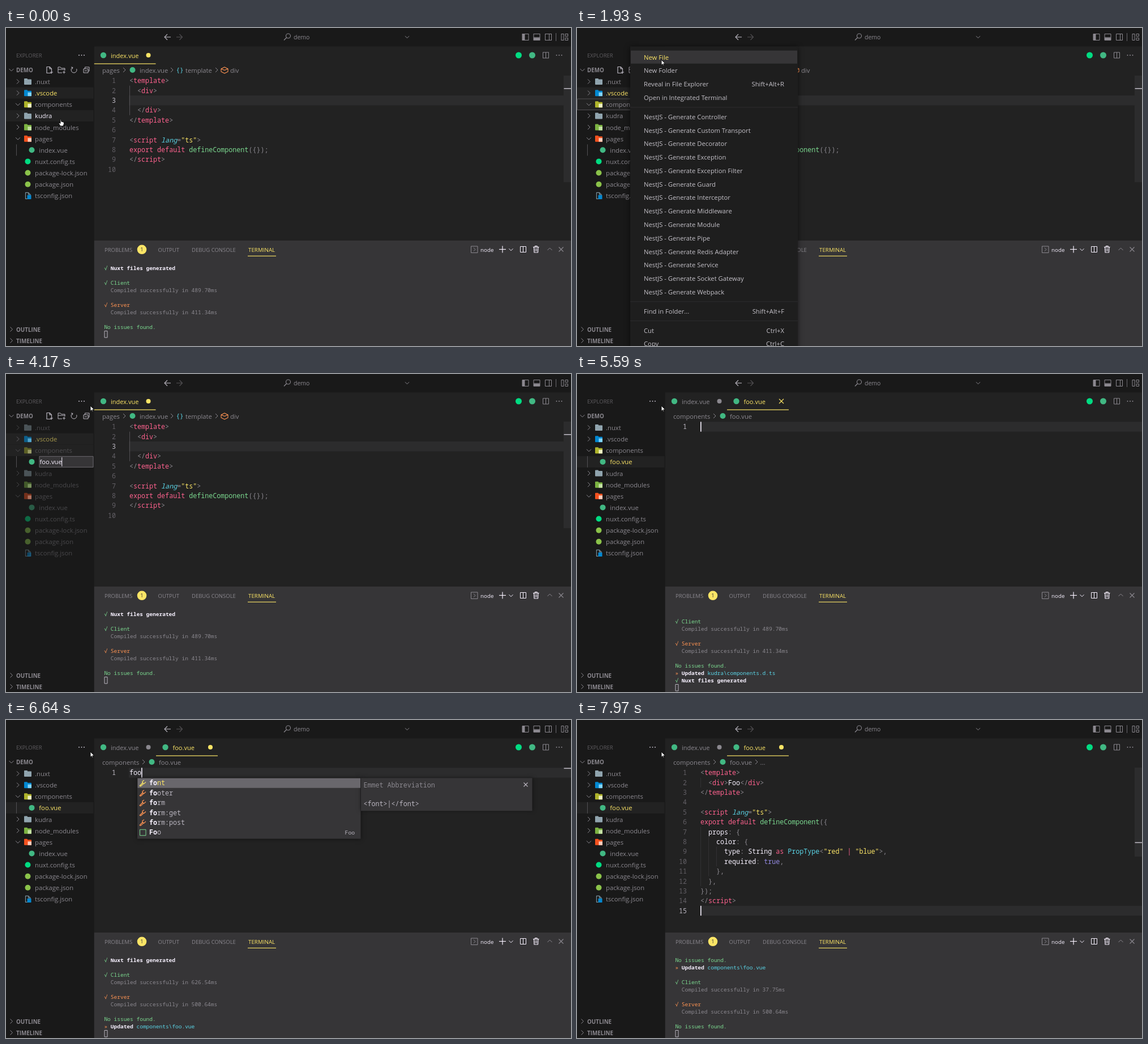
Write an HTML page with a canvas that moves like this. It is 998 px wide and 561 px high and loops after 8000 ms.

```html
<!DOCTYPE html>
<html lang="en">
<head>
<meta charset="utf-8">
<title>Editor demo</title>
<style>
html, body { margin: 0; width: 100%; height: 100%; overflow: hidden; background: #191919; }
canvas { display: block; width: 998px; height: 561px; }
</style>
</head>
<body>
<canvas id="stage" width="998" height="561"></canvas>
<script>
const ctx = document.getElementById('stage').getContext('2d');
const LOOP = 8000;
const UI = '"Open Sans", "Noto Sans", sans-serif';
const MONO = '"Noto Sans Mono", "DejaVu Sans Mono", monospace';
const C = {
  d: '#8b888f', p: '#fc618d', y: '#fce566', g: '#7bd88f', b: '#5ad4e6',
  v: '#948ae3', w: '#f7f1ff', o: '#fd9353', l: '#bab6c0', i: '#5ad4e6'
};
const DARK = '#191919', EDITOR = '#222222', PANEL = '#363537', FAINT = '#69676c';
const VUE = '#41b883', NUXT = '#00dc82';

// ---- primitives ----
function rect(x, y, w, h, color) { ctx.fillStyle = color; ctx.fillRect(x, y, w, h); }
function frame(x, y, w, h, color, lw = 1) {
  ctx.strokeStyle = color; ctx.lineWidth = lw; ctx.strokeRect(x, y, w, h);
}
function disc(x, y, r, color) {
  ctx.fillStyle = color; ctx.beginPath(); ctx.arc(x, y, r, 0, 7); ctx.fill();
}
function line(color, lw, ...pts) {
  ctx.strokeStyle = color; ctx.lineWidth = lw; ctx.beginPath();
  for (let i = 0; i < pts.length; i += 2) ctx.lineTo(pts[i], pts[i + 1]);
  ctx.stroke();
}
function poly(x, y, pts, fill, stroke) {
  ctx.beginPath();
  for (let i = 0; i < pts.length; i += 2) ctx.lineTo(x + pts[i], y + pts[i + 1]);
  ctx.closePath();
  ctx.fillStyle = fill; ctx.strokeStyle = stroke; ctx.lineWidth = 1;
  ctx.fill(); ctx.stroke();
}
// y is the middle of the capital letters
function text(s, x, y, color, size = 11.25, weight = '', align = 'left') {
  ctx.font = `${weight} ${size}px ${UI}`;
  ctx.textAlign = align; ctx.fillStyle = color;
  ctx.fillText(s, x, y + size * 0.36);
}
// Runs split by "~"; the first letter is the colour, a capital means bold
function code(src, x, y, size = 11.7) {
  ctx.textAlign = 'left';
  for (const run of src.split('~')) {
    const key = run[0], low = key.toLowerCase(), s = run.slice(1);
    ctx.font = `${key === 'i' ? 'italic' : ''} ${key !== low ? 'bold' : ''} ${size}px ${MONO}`;
    ctx.fillStyle = C[low];
    ctx.fillText(s, x, y + size * 0.35);
    x += ctx.measureText(s).width;
  }
}
function chevron(x, y, dir, color = C.d, r = 4) {
  if (dir === 'right') line(color, 1, x - r / 2, y - r, x + r / 2, y, x - r / 2, y + r);
  else {
    const k = dir === 'up' ? -1 : 1;
    line(color, 1, x - r, y - k * r / 2, x, y + k * r / 2, x + r, y - k * r / 2);
  }
}
function cross(x, y, r, color) {
  line(color, 1.1, x - r, y - r, x + r, y + r);
  line(color, 1.1, x + r, y - r, x - r, y + r);
}
function dots(x, y, color) { for (const k of [-4.5, 0, 4.5]) disc(x + k, y, 1, color); }
function split(x, y, color) { frame(x - 5, y - 5, 10, 10, color); line(color, 1, x, y - 5, x, y + 5); }

// ---- icons ----
function folder(x, y, color, badge) {
  ctx.fillStyle = color;
  ctx.beginPath();
  ctx.roundRect(x - 6.5, y - 5.5, 6, 4, 1);
  ctx.roundRect(x - 6.5, y - 4, 13, 9.5, 1);
  ctx.fill();
  if (badge) rect(x, y - 1, 6.5, 6.5, badge);
}
function page(x, y, color) {
  line(color, 1.2, x + 1, y - 5.5, x - 4, y - 5.5, x - 4, y + 5.5, x + 4.5, y + 5.5, x + 4.5, y - 2, x + 1, y - 5.5);
  line(color, 1.2, x + 1, y - 5.5, x + 1, y - 2, x + 4.5, y - 2);
}
const icons = {
  grey: (x, y) => folder(x, y, '#90a4ae'),
  blue: (x, y) => folder(x, y, '#0288d1', '#81d4fa'),
  lime: (x, y) => folder(x, y, '#afb42b', '#f0f4c3'),
  green: (x, y) => folder(x, y, '#7cb342', '#c5e1a5'),
  red: (x, y) => folder(x, y, '#f4511e', '#ffccbc'),
  vue: (x, y) => disc(x, y, 5, VUE),
  nuxt: (x, y) => disc(x, y, 5, NUXT),
  js: (x, y) => disc(x, y, 5, '#8bc34a'),
  ts: (x, y) => { page(x, y, '#78909c'); rect(x - 1, y - 1, 7, 7, '#0288d1'); },
  page: (x, y) => page(x, y, '#42a5f5')
};

// ---- sidebar ----
// name, icon, chevron, depth
const FILES = [
  ['.nuxt', 'grey', 'right'], ['.vscode', 'blue', 'right'], ['components', 'lime', 'down'],
  ['kudra', 'grey', 'right'], ['node_modules', 'green', 'right'], ['pages', 'red', 'down'],
  ['index.vue', 'vue', '', 1], ['nuxt.config.ts', 'nuxt'], ['package-lock.json', 'js'],
  ['package.json', 'js'], ['tsconfig.json', 'ts']
];
const NEW_ROW = ['foo.vue', 'vue', '', 1];
const TYPED = [[3200, 'f'], [3300, 'fo'], [3400, 'foo'], [3600, 'foo.'], [3800, 'foo.v'], [3970, 'foo.vu'], [4170, 'foo.vue']];
const ERROR = ['The name foo. is', 'not valid as a', 'file or folder', 'name. Please', 'choose a', 'different name.'];
const last = (list, t) => list.reduce((r, [at, v]) => t >= at ? v : r, '');

function sidebar(t) {
  rect(0, 0, 155.5, 561, DARK);
  text('EXPLORER', 18, 48.5, '#5f5d61', 9.5);
  dots(133.5, 48, C.l);
  chevron(9.5, 74, 'down');
  text('DEMO', 18, 74.5, C.d, 9.8, 'bold');

  const editing = t >= 2010 && t < 4530, made = t >= 4530;
  if (!made) {
    page(76, 74, C.l); line(C.l, 1, 78, 78, 83, 78); line(C.l, 1, 80.5, 75.5, 80.5, 80.5);
    line(C.l, 1, 99, 79, 92, 79, 92, 69, 96, 69, 98, 71, 104, 71, 104, 75);
    line(C.l, 1, 92, 73, 104, 73); line(C.l, 1, 100, 78, 105, 78); line(C.l, 1, 102.5, 75.5, 102.5, 80.5);
    ctx.beginPath(); ctx.arc(120, 74, 5, -0.4, 4.2); ctx.stroke();
    line(C.l, 1, 115, 69, 118, 69.5, 117, 72.5);
    frame(137, 72, 8, 7, C.l); line(C.l, 1, 139.5, 72, 139.5, 69, 147, 69, 147, 76, 145, 76);
    line(C.l, 1, 139, 75.5, 143, 75.5);
  }
  const rows = FILES.slice();
  if (editing || made) rows.splice(3, 0, NEW_ROW);
  const hover = t < 220 ? 3 : t < 1960 ? 2 : -1;
  rows.forEach(([name, icon, chev, depth = 0], i) => {
    const y = 94.5 + 20.13 * i, top = y - 10, x = 38.5 + depth * 7;
    const selected = made ? i === 3 : i === 1;
    if (selected || i === hover || (editing && i === 2)) rect(0, top, 154.5, 20, EDITOR);
    const fresh = editing && i === 3;
    if (depth && (fresh || (made && i === 3) || (!editing && !made))) line('#525053', 1, 18.5, top, 18.5, top + 20);
    if (fresh) return input(t, y);
    ctx.globalAlpha = editing ? (selected ? 0.6 : 0.42) : 1;
    if (chev) chevron(21, y, chev);
    icons[icon](x, y);
    const bright = i === hover && t < 1110;
    text(name, 51 + depth * 7.3, y + 0.5, selected ? C.y : bright ? C.w : C.d);
    ctx.globalAlpha = 1;
  });
  if (t >= 1110 && t < 2010) frame(0.5, 125, 154, 19.5, '#525053');
  if (t >= 3600 && t < 3800) {
    rect(58.5, 164.5, 96.5, 87, PANEL);
    frame(59, 165, 95.5, 86.5, C.p);
    ERROR.forEach((s, i) => text(s, 62, 174 + i * 13.7, C.p, 10.3));
  }
  for (const [s, y] of [['OUTLINE', 531.5], ['TIMELINE', 551.5]]) {
    chevron(9.5, y, 'right');
    text(s, 18, y + 0.5, C.d, 9.8, 'bold');
  }
}
function input(t, y) {
  const s = last(TYPED, t);
  icons[t >= 4170 ? 'vue' : 'page'](45.5, y);
  rect(58.5, y - 10, 96, 20, PANEL);
  frame(59, y - 9.5, 95, 19, FAINT);
  text(s, 59.5, y + 0.5, C.w);
  const on = t < 2540 || t >= 3070;
  if (on) rect(59 + (s ? ctx.measureText(s).width : 0), y - 8, 1, 16, C.w);
}

// ---- editor ----
const SCRIPT = 'd<~pscript ~ilang~d=~y"ts"~d>';
const INDEX = [
  'd<~ptemplate~d>', 'd  <~pdiv~d>', 'd', 'd  </~pdiv~d>', 'd</~ptemplate~d>', 'd', SCRIPT,
  'pexport default ~gdefineComponent~d({});', 'd</~pscript~d>', 'd'
];
const FOO = [
  'd<~ptemplate~d>', 'd  <~pdiv~d>~wFoo~d</~pdiv~d>', 'd</~ptemplate~d>', 'd', SCRIPT,
  'pexport default ~gdefineComponent~d({', 'w  props~d: {', 'w    color~d: {',
  'w      type~d: ~wString ~pas ~bPropType~d<~y"red"~p | ~y"blue"~d>,',
  'w      required~d: ~vtrue~d,', 'd    },', 'd  },', 'd});', 'd</~pscript~d>', 'd'
];
const LINE = 17.39, TOP = 84.3, COL = 7.02, LEFT = 218;
const WORD = [[6250, 'f'], [6480, 'fo'], [6610, 'foo']];

function tab(x, name, active, mark) {
  disc(x + 16.5, 48, 5.2, VUE);
  text(name, x + 29.5, 49, active ? C.y : C.d, 11);
  const color = active ? C.y : C.d;
  if (mark === 'x') cross(x + 96, 48, 4, color);
  else disc(x + 96, 48, 4, color);
  if (active) rect(x, 62.5, 109, 1.2, C.y);
}
function crumbs(parts) {
  for (const [kind, x, s] of parts) {
    if (kind === '>') chevron(x, 74, 'right', C.d, 4);
    else if (kind === 'vue') disc(x, 74, 5, VUE);
    else text(s, x, 74.5, C.d, 11.2);
  }
}
function editor(t) {
  rect(155.5, 32.5, 842.5, 342.5, EDITOR);
  const opened = t >= 4590, done = t >= 7640;
  const word = last(WORD, t);
  tab(155.5, 'index.vue', !opened);
  if (opened) tab(265, 'foo.vue', true, t < 6250 ? 'x' : 'dot');
  disc(905.5, 48, 5.5, NUXT);
  disc(929.5, 48, 5.5, VUE);
  split(953.5, 48, C.d);
  dots(977, 48, C.d);

  if (!opened) {
    crumbs([['', 170, 'pages'], ['>', 209], ['vue', 223.5], ['', 236, 'index.vue'], ['>', 293],
      ['', 317, 'template'], ['>', 372], ['', 396, 'div']]);
    code('b{}', 300.5, 74, 11);
    ctx.lineJoin = 'round';
    line(C.o, 1.1, 380, 72, 386, 69, 392, 72, 392, 77, 386, 80, 380, 77, 380, 72, 386, 74.5, 392, 72);
  } else {
    crumbs([['', 170, 'components'], ['>', 243], ['vue', 257.5], ['', 270, 'foo.vue']]);
    if (t >= 7970) crumbs([['>', 317], ['', 323.5, '...']]);
  }

  const lines = !opened ? INDEX : done ? FOO : ['w' + word];
  const active = !opened ? 2 : done ? 14 : 0;
  rect(217, TOP + active * LINE, 781, LINE, '#2c2c2d');
  const rail = !opened ? 188 : done ? 157 : 0;
  rect(985, 84, 13, rail, '#2c2c2d');
  const mark = !opened ? 106 : done ? 215.5 : word ? 84.5 : 0;
  if (mark) rect(985.5, mark, 12.5, 1.6, C.l);
  if (!opened) line('#525053', 1, 218.5, TOP + LINE, 218.5, TOP + 4 * LINE);
  if (done) {
    [[0, 1, 2], [0, 6, 12], [2, 7, 11], [4, 8, 10]].forEach(([col, a, b]) => {
      const x = Math.round(LEFT + col * COL) + 0.5;
      line('#323133', 1, x, TOP + a * LINE, x, TOP + b * LINE);
    });
  }
  lines.forEach((src, i) => {
    const y = 93.2 + i * LINE;
    ctx.font = `11.7px ${MONO}`; ctx.textAlign = 'right';
    ctx.fillStyle = i === active ? C.l : '#625f65';
    ctx.fillText(i + 1, 194, y + 4.1);
    code(src, LEFT, y);
  });
  if (opened) {
    const off = (t >= 5090 && t < 5590) || (t >= 7120 && t < 7550);
    const x = LEFT + (done ? 0 : word.length * COL);
    if (!off) rect(x, TOP + active * LINE, 1.6, LINE, C.w);
  }
  if (t >= 6520 && !done) suggest(t);
}

function wrench(x, y, color) {
  line(color, 1.4, x - 5, y + 5, x + 1, y - 1);
  line(color, 1.2, x + 3, y - 5, x, y - 3, x, y, x + 3, y + 1, x + 6, y - 2);
  line(color, 1.2, x - 5, y + 5, x - 3, y + 5.5, x + 2, y + 1);
}
function suggest(t) {
  const early = t < 6730;
  const items = early ? ['font', 'footer', 'form', 'form:get', 'form:post', 'Foo'] : ['footer', 'Foo'];
  const bold = early ? 2 : 3, pick = t >= 7550 ? 1 : 0;
  ctx.shadowColor = 'rgba(0,0,0,.5)'; ctx.shadowBlur = 7;
  rect(232, 102.3, 394.5, 2.2 + items.length * 17.5, PANEL);
  if (!pick) rect(627, 102.3, 302.5, 58, PANEL);
  ctx.shadowBlur = 0;
  items.forEach((s, i) => {
    const y = 111.3 + i * LINE, on = i === pick;
    if (on) rect(232.5, y - 8.5, 393.5, 17, FAINT);
    if (s === 'Foo') {
      frame(236.5, y - 5, 10.5, 10.5, on ? C.y : C.g);
      code('lFoo', 598.5, y, 9.8);
    } else wrench(241, y, on ? C.y : C.o);
    code('W' + s.slice(0, bold) + (on ? '~y' : '~l') + s.slice(bold), 253, y);
  });
  if (pick) return;
  const tag = items[0];
  code('dEmmet Abbreviation', 631.5, 115);
  cross(918, 114, 3.5, C.l);
  code(`l<${tag}>|</${tag}>`, 631.5, 148);
}

// ---- panel ----
const OK = 'g√ ~WNuxt files generated';
const CLIENT = 'g√ Client', SERVER = 'o√ Server', CLEAN = 'gNo issues found.';
const ready = ms => `d  Compiled successfully in ${ms}ms`;
const UPDATED = 'o» ~WUpdated ~bcomponents\\foo.vue';
const build = (a, b) => [CLIENT, ready(a), 'd', SERVER, ready(b), 'd', CLEAN];
const FIRST = build('489.70', '411.34'), SECOND = build('626.54', '500.64');
const TERMINAL = [
  [0, [OK, 'd', ...FIRST]],
  [4700, ['d', ...FIRST, 'o» ~WUpdated ~bkudra\\components.d.ts', OK]],
  [5690, [OK, 'd', CLIENT, 'd', 'd', SERVER, 'd', 'd']],
  [6290, [OK, 'd', ...SECOND]],
  [6520, [OK, 'd', ...SECOND, UPDATED]],
  [6730, [CLEAN, UPDATED, 'd', ...build('37.75', '500.64')]]
];
function panel(t) {
  rect(155.5, 375, 842.5, 186, PANEL);
  const tabs = [['PROBLEMS', 174], ['OUTPUT', 268.5], ['DEBUG CONSOLE', 328], ['TERMINAL', 428]];
  tabs.forEach(([s, x], i) => text(s, x, 391.5, i === 3 ? C.y : C.d, i === 3 ? 9.8 : 9.5));
  rect(427, 401.7, 50, 1.1, C.y);
  disc(240, 390.8, 8.3, C.y);
  text('1', 240, 391, PANEL, 9.3, '', 'center');

  frame(821.5, 385, 11.5, 11.5, C.d);
  chevron(827.5, 390.7, 'right', C.d, 3);
  text('node', 838, 391.3, C.w, 9.8);
  line(C.w, 1.2, 871, 390.5, 883, 390.5); line(C.w, 1.2, 877, 384.5, 877, 396.5);
  chevron(892, 391, 'down', C.w, 3.5);
  split(913.5, 390.5, C.w);
  line(C.w, 1.2, 931, 386.5, 941.5, 386.5); line(C.w, 1.2, 934.5, 386, 934.5, 384.5, 938, 384.5, 938, 386);
  line(C.w, 1.2, 932.5, 387, 933, 396, 939.5, 396, 940, 387);
  line(C.w, 1, 935, 388.5, 935, 394); line(C.w, 1, 937.5, 388.5, 937.5, 394);
  chevron(960.5, 390, 'up', C.d, 4);
  cross(980.5, 390.5, 4, C.d);

  const rows = last(TERMINAL, t), pitch = 12.95;
  rows.forEach((s, i) => code(s, 173.4, 424 + i * pitch, 9.53));
  frame(174, 418 + rows.length * pitch, 5, 11.5, C.l);
}

// ---- window top ----
function titlebar() {
  rect(0, 0, 998, 32.5, DARK);
  line(C.l, 1.1, 291, 16, 280, 16); line(C.l, 1.1, 285, 11, 280, 16, 285, 21);
  line('#525053', 1.1, 301, 16, 311, 16); line('#525053', 1.1, 306.5, 11, 311.5, 16, 306.5, 21);
  ctx.strokeStyle = C.d; ctx.lineWidth = 1.1;
  ctx.beginPath(); ctx.arc(498.5, 14, 4, 0, 7); ctx.stroke();
  line(C.d, 1.2, 495.5, 17, 491, 21.5);
  text('demo', 508, 16.5, C.d, 10.5);
  chevron(708.5, 16, 'down', C.d, 3.5);
  for (const x of [912, 932, 952.5]) frame(x, 10.5, 11, 11, C.d);
  rect(912, 10.5, 4.5, 11, C.d);
  rect(932, 16.5, 11, 5, C.d);
  line(C.d, 1, 959.5, 10.5, 959.5, 21.5);
  line(FAINT, 1, 971.5, 9, 971.5, 23);
  frame(981, 10.5, 4, 11, C.d);
  frame(988, 10.5, 4.5, 4, C.d);
  frame(988, 17.5, 4.5, 4, C.d);
}

// ---- context menu ----
const KINDS = ['Controller', 'Custom Transport', 'Decorator', 'Exception', 'Exception Filter', 'Guard', 'Interceptor',
  'Middleware', 'Module', 'Pipe', 'Redis Adapter', 'Service', 'Socket Gateway', 'Webpack'];
const MENU = ['New File', 'New Folder', 'Reveal in File Explorer|Shift+Alt+R', 'Open in Integrated Terminal', '-',
  ...KINDS.map(k => 'NestJS - Generate ' + k), '-', 'Find in Folder...|Shift+Alt+F', '-', 'Cut|Ctrl+X', 'Copy|Ctrl+C'];

function menu(t, pointerY) {
  if (t < 1110 || t >= 1960) return;
  const a = Math.min(1, (t - 1080) / 235);
  ctx.globalAlpha = a;
  ctx.shadowColor = 'rgba(0,0,0,.6)'; ctx.shadowBlur = 9;
  rect(94, 32.5, 296, 540, '#1e1e1e');
  ctx.shadowBlur = 0;
  ctx.globalAlpha = Math.min(1, a * 1.25);
  let y = 51.3;
  for (const item of MENU) {
    if (item === '-') {
      rect(94, y - 7, 296, 1, '#2d2c2e');
      y += 10.1;
      continue;
    }
    const [label, keys] = item.split('|');
    const on = t > 1330 && Math.abs(pointerY - y) < 11.9;
    if (on) rect(95, y - 11.5, 294, 23, PANEL);
    const color = on ? C.y : '#c4c1c8';
    text(label, 118, y + 0.3, color, 11.25);
    if (keys) text(keys, 366, y + 0.3, color, 11.25, '', 'right');
    y += 23.77;
  }
  ctx.globalAlpha = 1;
}

// ---- pointer ----
const PATH = [[180, 97, 161], [270, 99, 142], [770, 99, 142], [810, 105, 142], [1330, 105, 142], [1900, 149, 56]];
function pointerAt(t) {
  let prev = PATH[0];
  for (const next of PATH) {
    if (t < next[0]) {
      const k = Math.max(0, (t - prev[0]) / (next[0] - prev[0] || 1));
      const e = k * k * (3 - 2 * k);
      return [prev[1] + (next[1] - prev[1]) * e, prev[2] + (next[2] - prev[2]) * e];
    }
    prev = next;
  }
  return [prev[1], prev[2]];
}
function pointer(t, x, y) {
  if (t < 1110) {
    poly(x, y, [-1, 0, 0.5, 0, 0.8, 4, 5, 5, 5.5, 8, 4, 12, -1, 12, -4, 7, -3, 6, -1, 7.5], '#fff', '#111');
  } else {
    poly(x, y, [0, 0, 0, 9.5, 2.2, 7.6, 3.7, 10.6, 5, 10, 3.6, 7, 6.6, 6.8], '#fff', '#111');
  }
}

function draw(now) {
  const t = now % LOOP;
  const [px, py] = pointerAt(t);
  titlebar();
  editor(t);
  panel(t);
  sidebar(t);
  menu(t, py);
  pointer(t, px, py);
  requestAnimationFrame(draw);
}
requestAnimationFrame(draw);
</script>
</body>
</html>
```
